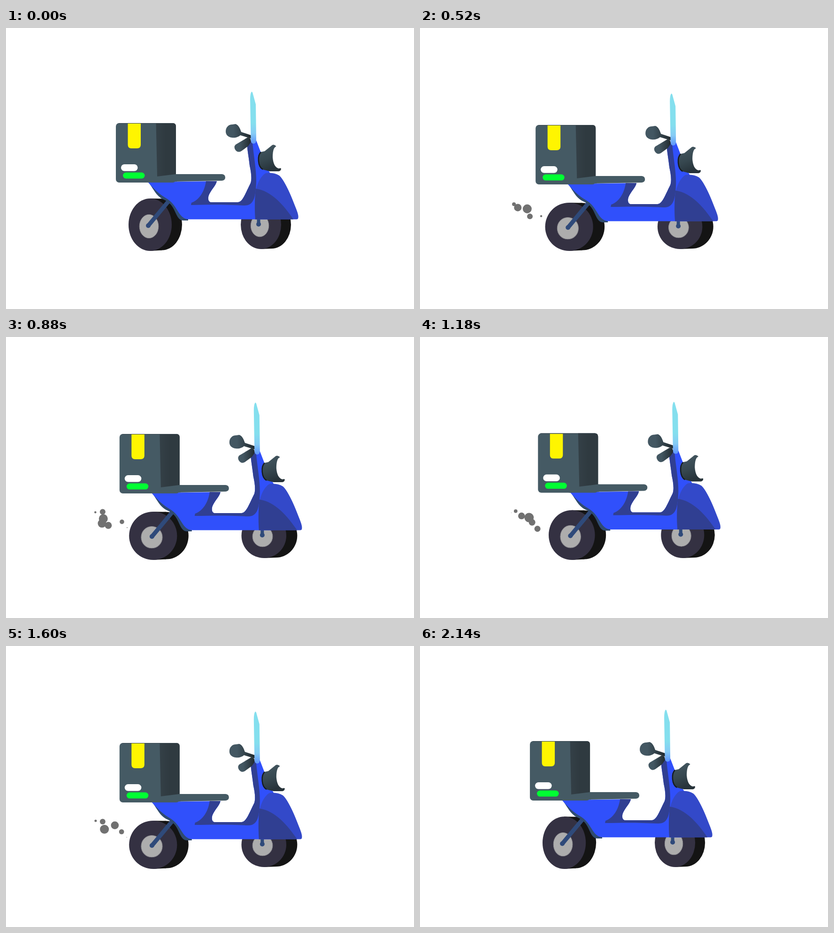
Write an HTML page that moves like this. It is 869x600 px and loops after 2.16 s.

```html
<!DOCTYPE html>
<html lang="en">
<head>
<meta charset="utf-8">
<title>Delivery scooter</title>
<style>
html, body { margin: 0; width: 100%; height: 100%; overflow: hidden; background: #fff; }
svg { display: block; width: 869px; height: 600px; }
</style>
</head>
<body>
<svg viewBox="0 0 869 600" xmlns="http://www.w3.org/2000/svg">
  <defs>
    <linearGradient id="glass" x1="0" y1="0" x2="0" y2="1">
      <stop offset=".6" stop-color="#84dfee"/>
      <stop offset=".8" stop-color="#86ccf5"/>
      <stop offset="1" stop-color="#5d93fb"/>
    </linearGradient>
    <linearGradient id="lamp" x1="0" y1="0" x2=".35" y2="1">
      <stop offset="0" stop-color="#465a64"/>
      <stop offset=".6" stop-color="#36474f"/>
      <stop offset="1" stop-color="#27333a"/>
    </linearGradient>
    <linearGradient id="grip" x1="0" y1="0" x2="1" y2="0">
      <stop offset=".3" stop-color="#435762"/>
      <stop offset="1" stop-color="#20292e"/>
    </linearGradient>
    <linearGradient id="side" x1="0" y1="0" x2="1" y2="0">
      <stop offset="0" stop-color="#344047"/>
      <stop offset=".5" stop-color="#2f3a40"/>
    </linearGradient>
  </defs>

  <g id="smoke" fill="#717171"></g>

  <g id="rear">
    <g fill="#141414">
      <path d="M307 364L332 364.500V474.500L307 476Z"/>
      <ellipse cx="332" cy="419.500" rx="43" ry="55"/>
    </g>
    <ellipse cx="307" cy="420" rx="46" ry="56" fill="#343142"/>
    <ellipse cx="304.500" cy="423.500" rx="20.300" ry="25.200" fill="#adadad" stroke="#8b8a8f"/>
  </g>
  <g id="front">
    <g fill="#141414">
      <path d="M543 368L566 369V471L543 472Z"/>
      <ellipse cx="566" cy="420" rx="41" ry="51"/>
    </g>
    <ellipse cx="543" cy="420" rx="43" ry="52" fill="#343142"/>
    <ellipse cx="540.500" cy="422" rx="19.200" ry="23.800" fill="#adadad" stroke="#8b8a8f"/>
  </g>

  <g id="body">
    <g stroke="#2f4a7a" stroke-width="9" fill="#2f4a7a">
      <path d="M303 422L347 369"/>
      <path d="M538 419V400" stroke-width="7"/>
      <circle cx="303" cy="422" r="5" stroke="none"/>
      <circle cx="538" cy="419" r="5" stroke="none"/>
    </g>
    <path fill="#2f4b70" d="M306 333C314 344 320 358 333 365C345 370 352 376 357 386C364 400 367 411 378 411H388V404L370 375L335 340Z"/>
    <!-- frame -->
    <path fill="#3050fb" d="M302 329L449 327C447 337 437 345 432 357C429 366 432 372 437 372H494C504 371 509 355 521 331C524 322 522 307 519 294C517 275 514 262 513 244L533 240L543 266L552 292L562 309L560 408.500H390C376 408 371 399 364 388C354 371 347 367 337 361C324 353 313 341 302 329Z"/>
    <path fill="#303f92" d="M426 327H449C447 337 437 345 432 357C429 366 432 372 437 372H494C504 371 509 355 521 331C524 322 522 307 519 294C517 275 514 262 513 244H525C527 270 533 300 533 325C533 340 531 362 526 369C521 378 514 379 506 379C470 377 435 377 394 378L395 373C411 368 423 349 426 327Z"/>
    <path fill="#3349c9" d="M531 408.500C530 380 530 355 533 344C536 330 543 316 553 310C563 308 574 310 582 315C593 325 606 354 618 386C621 394 624 402 622 407Q621 408.500 617 408.500Z"/>
    <path fill="#303f92" d="M531 408.500C529 385 530 359 532 343C566 348 592 379 612 408.500Z"/>
    <!-- seat and parcel -->
    <path fill="#455a64" d="M300 316L362 312H460Q467 313 467 319T460 326L356 328L300 330Z"/>
    <rect x="234" y="203" width="128" height="127" rx="7" fill="#455a64"/>
    <path fill="#455a64" d="M322 317L364 312V328L340 329.500H322Z"/>
    <path fill="url(#side)" d="M319.500 203H355Q362 203 362 210V312L322 317Z"/>
    <path fill="#fff500" d="M259.500 204H287V249Q287 257 279 257H267Q259.500 257 259.500 249Z"/>
    <path stroke="#35444c" d="M240 203.500H356"/>
    <rect x="245" y="291" width="35.500" height="14.500" rx="7.200" fill="#fff"/>
    <rect x="249" y="308.500" width="46.500" height="13" rx="6.500" fill="#00ff33"/>
    <!-- handlebar, screen and lamp -->
    <path fill="url(#grip)" d="M468 221C468 212 474 206 482 206L489 205C495 207 498 213 501 222L522 229V236L499 229C495 233 488 235 481 234C473 233 468 228 468 221Z"/>
    <path fill="url(#grip)" d="M489 249L514 234Q522 233 522 243L516 252L501 263Q494 267 489 261Q484 254 489 249Z"/>
    <path fill="url(#glass)" d="M523 136Q525 136 526 141L532 163L533 239Q533 247 527 247Q522 247 521.500 240L520 153Q520 140 523 136Z"/>
    <path fill="url(#lamp)" d="M551 263L567 250Q571 248 575 252L576 256L584 299L586 300Q586 305 581 306H562L546 302C535 296 535 272 542 265Z"/>
    <path fill="none" stroke="#151b20" stroke-width="2.500" d="M547 302C536 296 535 272 543 265"/>
    <path fill="#fff" d="M576 253C570 254 568 264 568 276C569 289 573 298 581 300L589 298L584 252Z"/>
  </g>
</svg>
<script>
const LOOP = 2160, STEP = 20, LIFE = 420;
const SWAY = 20, DIP = 4.1;
const START = [252, 404], END = [178, 372];

// birth time, then the bend of the path
const puffs = [
  [85, 208, 380], [155, 216, 370], [224, 206, 383], [352, 202, 369],
  [434, 169, 390], [490, 209, 357], [546, 230, 359], [610, 198, 411],
  [628, 198, 386], [767, 159, 395], [813, 211, 357], [868, 220, 386],
  [970, 215, 378], [1076, 182, 380], [1085, 208, 417], [1214, 209, 352],
  [1266, 230, 365], [1348, 203, 393], [1468, 204, 353], [1524, 214, 369],
  [1591, 190, 412]
];

const $ = id => document.getElementById(id);
const body = $('body'), smoke = $('smoke');
const dots = puffs.map(() => smoke.appendChild(
  document.createElementNS('http://www.w3.org/2000/svg', 'circle')));

// cubic-bezier(k, 0, 1 - k, 1)
function ease(p, k) {
  let lo = 0, hi = 1, s = .5;
  for (let i = 0; i < 18; i++) {
    s = (lo + hi) / 2;
    const x = 3 * s * (1 - s) * ((1 - s) * k + s * (1 - k)) + s ** 3;
    if (x < p) lo = s; else hi = s;
  }
  return s * s * (3 - 2 * s);
}

// 0 to 1 and back once per period
function swing(t, period, k) {
  const p = (t % period) / period * 2;
  return ease(p < 1 ? p : 2 - p, k);
}

const move = (el, x, y) => el.setAttribute('transform', `translate(${x} ${y})`);

function squash(id, dx, q, cx, ground) {
  const sx = 1 + .112 * q, sy = 1 - .081 * q;
  $(id).setAttribute('transform',
    `translate(${cx + dx} ${ground}) scale(${sx} ${sy}) translate(${-cx} ${-ground})`);
}

function drawPuff(dot, [birth, bx, by], t) {
  const u = (t - birth) / LIFE;
  const alive = u > 0 && u < 1;
  dot.setAttribute('r', alive ? 10 * Math.sin(Math.PI * u) : 0);
  if (!alive) return;
  const at = (i, b) => (1 - u) ** 2 * START[i] + 2 * u * (1 - u) * b + u * u * END[i];
  dot.setAttribute('cx', at(0, bx));
  dot.setAttribute('cy', at(1, by));
}

function draw(t) {
  const dx = SWAY * swing(t, 720, .5);
  const q = swing(t, 360, .58);
  move(body, dx, DIP * q);
  move(smoke, dx, DIP * q);
  squash('rear', dx, q, 321, 476);
  squash('front', dx, q, 557, 472);
  puffs.forEach((p, i) => drawPuff(dots[i], p, t));
}

const origin = performance.now();
function tick() {
  const t = (performance.now() - origin) % LOOP;
  draw(Math.floor(t / STEP) * STEP);
  requestAnimationFrame(tick);
}
draw(0);
requestAnimationFrame(tick);
</script>
</body>
</html>
```
